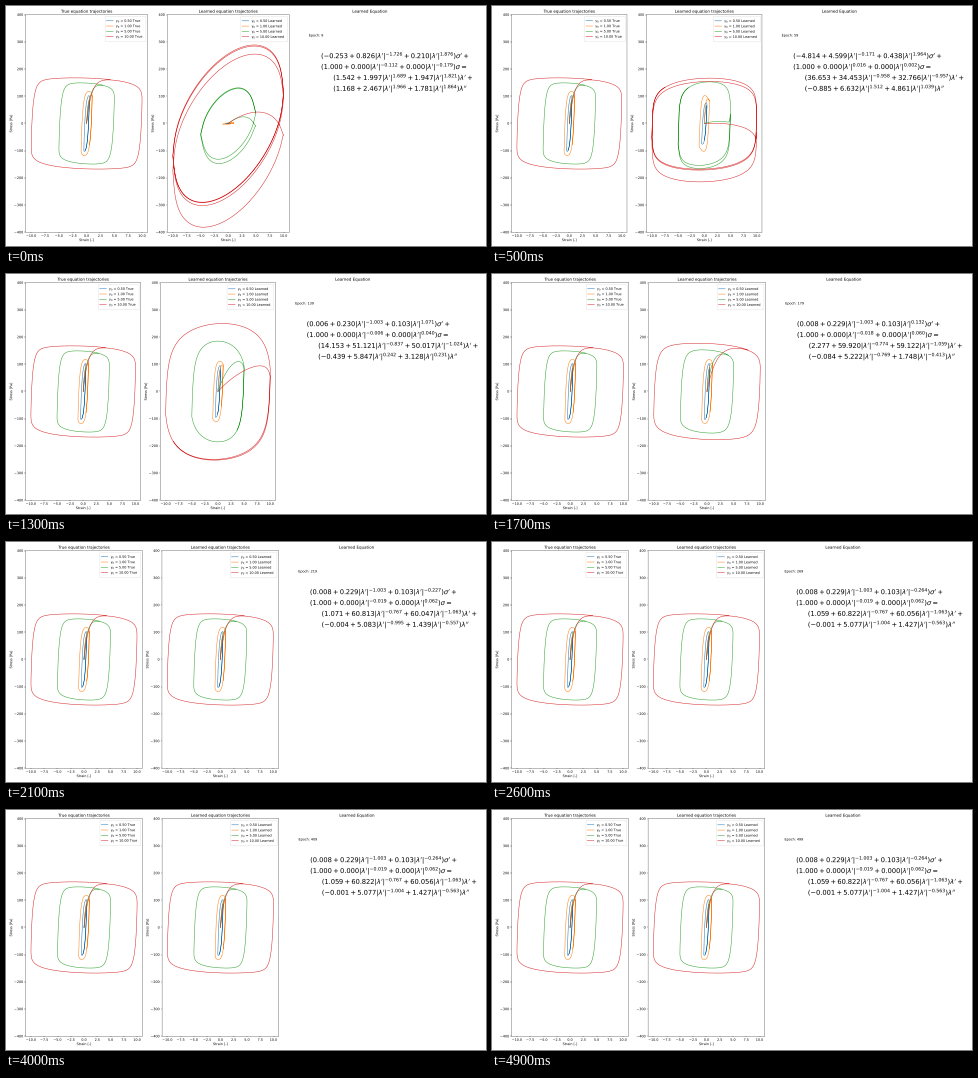
These frames come from a looping animation (480x240 px, 5 s). A matplotlib script:

```python
import numpy as np
import matplotlib.pyplot as plt
from matplotlib import patheffects
from matplotlib.animation import FuncAnimation

FRAMES, INTERVAL, DPI = 50, 100, 24
AMPLITUDES = np.array([0.5, 1.0, 5.0, 10.0])
CYCLES, STEPS_PER_CYCLE = 4, 400
EARLY_FRAME = 5

# Outline text and unsnapped strokes keep small details at true positions.
plt.rcParams.update({
    "path.effects": [patheffects.Normal()],
    "path.snap": False,
    "text.hinting": "none",
})


def learn(start, early, final, span):
    """Move evenly from start to early, then settle on final within the span."""
    start, early, final = map(np.array, (start, early, final))
    i = np.arange(FRAMES)[:, None]
    opening = start + (early - start) * np.minimum(i / EARLY_FRAME, 1)
    left = np.exp(-(np.maximum(i - EARLY_FRAME, 0) / np.array(span)) ** 3)
    return final + (opening - final) * left


def factor(params, x):
    c0, c1, e1, c2, e2 = params.T[:, :, None]
    return c0 + c1 * x ** e1 + c2 * x ** e2


def simulate():
    """Integrate the stress for every frame and amplitude under sine strain."""
    dt = 2 * np.pi / STEPS_PER_CYCLE
    stress = np.zeros((CYCLES * STEPS_PER_CYCLE + 1, FRAMES, len(AMPLITUDES)))
    for n in range(len(stress) - 1):
        t = (n + 0.5) * dt
        rate, accel = AMPLITUDES * np.cos(t), -AMPLITUDES * np.sin(t)
        speed = np.abs(rate)
        relaxation = np.maximum(factor(stress_rate, speed), 0.02)
        drive = factor(strain_rate, speed) * rate + factor(strain_accel, speed) * accel
        stress[n + 1] = stress[n] - (drive - stress[n]) * np.expm1(-dt / relaxation)
    time = np.arange(len(stress)) * dt
    return np.sin(time)[:, None] * AMPLITUDES, stress


def hide_repeats(stress, tolerance=1.0):
    """Blank the parts that retrace the cycle before, so strokes stay light."""
    visible = stress.copy()
    change = np.abs(stress[STEPS_PER_CYCLE:] - stress[:-STEPS_PER_CYCLE])
    visible[STEPS_PER_CYCLE:][change < tolerance] = np.nan
    return visible


def factor_text(c0, c1, e1, c2, e2):
    rate = r"|\lambda'|"
    return f"({c0:.3f} + {c1:.3f}{rate}^{{{e1:.3f}}} + {c2:.3f}{rate}^{{{e2:.3f}}})"


def draw_panel(ax, kind, stress):
    lines = [
        ax.plot(strain[:, k], stress[:, k], label=rf"$\gamma_0$ = {amp:.2f} {kind}")[0]
        for k, amp in enumerate(AMPLITUDES)
    ]
    ax.set(title=f"{kind} equation trajectories", xlabel="Strain [-]",
           ylabel="Stress [Pa]", xlim=(-11, 11), ylim=(-400, 400))
    # Text heights round up at this low resolution; tighter rows make up for it.
    ax.legend(loc="upper right", labelspacing=-0.48)
    return lines


# Each factor is c0 + c1 |x|^e1 + c2 |x|^e2, given as c0, c1, e1, c2, e2.
stress_rate = learn(
    start=[-0.253, 0.826, -1.726, 0.210, 1.876],
    early=[-4.814, 4.599, -0.171, 0.438, 1.964],
    final=[0.008, 0.229, -1.003, 0.103, -0.264],
    span=[4, 4, 4, 4, 10])
stress_scale = learn(
    start=[1, 0, -0.112, 0, -0.179],
    early=[1, 0, 0.016, 0, 0.002],
    final=[1, 0, -0.019, 0, 0.062],
    span=8)
strain_rate = learn(
    start=[1.542, 1.997, 1.689, 1.947, 1.821],
    early=[36.653, 34.453, -0.958, 32.766, -0.957],
    final=[1.059, 60.822, -0.767, 60.056, -1.063],
    span=8)
strain_accel = learn(
    start=[1.168, 2.467, 1.966, 1.781, 1.864],
    early=[-0.885, 6.632, 1.512, 4.861, 1.039],
    final=[-0.001, 5.077, -1.004, 1.427, -0.563],
    span=9)
terms = [(stress_rate, r"\sigma' +"), (stress_scale, r"\sigma ="),
         (strain_rate, r"\lambda' +"), (strain_accel, r"\lambda''")]

strain, stress = simulate()
trajectories = hide_repeats(stress)

fig, (true_ax, learned_ax, text_ax) = plt.subplots(1, 3, figsize=(20, 10), dpi=DPI)
draw_panel(true_ax, "True", trajectories[:, -1])
learned_lines = draw_panel(learned_ax, "Learned", trajectories[:, 0])

text_ax.set_title("Learned Equation")
text_ax.axis("off")
epoch_text = text_ax.text(0, 0.9, "")
equation_texts = [
    text_ax.text(0.1 + 0.1 * (row > 1), 0.8 - 0.05 * row, "", fontsize=20)
    for row in range(len(terms))
]


def fit_layout():
    """Fit the panels around the equation, always from the same start."""
    fig.subplots_adjust(left=0.125, right=0.9, bottom=0.11, top=0.88, wspace=0.2)
    fig.set_dpi(100)  # finer text measurements
    fig.tight_layout()
    fig.set_dpi(DPI)


def update(i):
    for k, line in enumerate(learned_lines):
        line.set_ydata(trajectories[:, i, k])
    epoch_text.set_text(f"Epoch: {10 * i + 9}")
    for text, (params, symbol) in zip(equation_texts, terms):
        text.set_text(f"${factor_text(*params[i])}{symbol}$")
    fit_layout()
    return [*learned_lines, epoch_text, *equation_texts]


animation = FuncAnimation(fig, update, frames=FRAMES, interval=INTERVAL,
                          init_func=lambda: update(0), repeat=True, repeat_delay=0)
plt.show()
```
